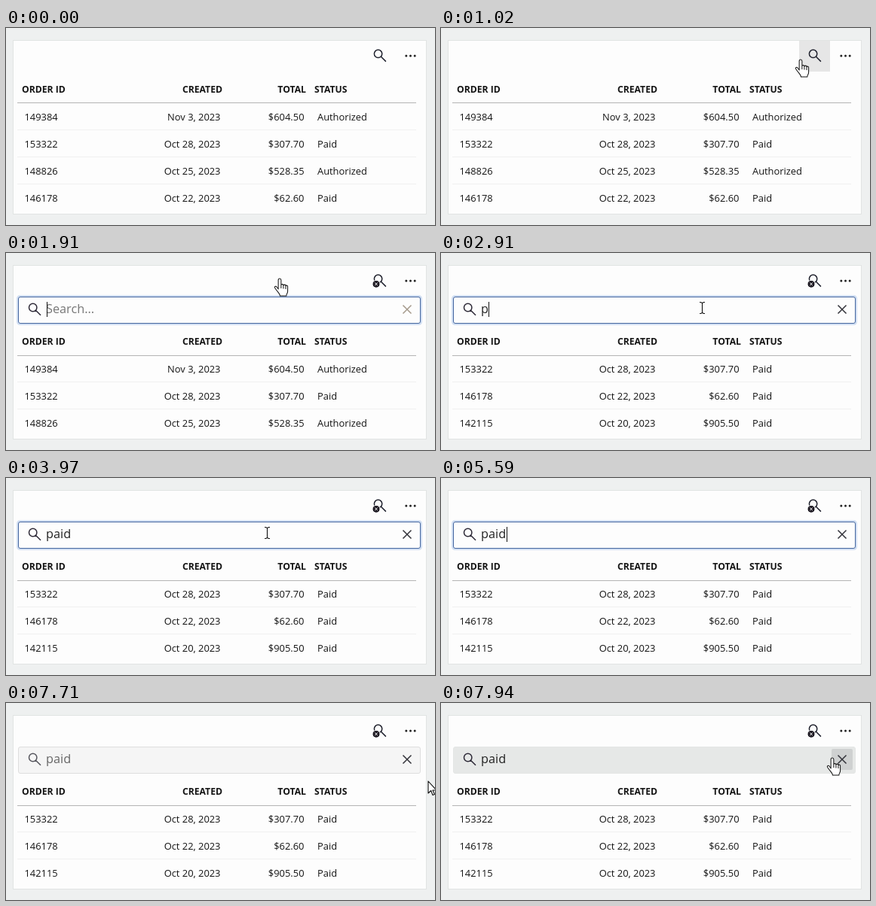
An HTML page for the animation above (8 s loop, 569x262 px).

```html
<!DOCTYPE html>
<html lang="en">
<head>
<meta charset="utf-8">
<title>Order search</title>
<style>
  html, body { margin: 0; height: 100%; overflow: hidden; background: #eef0f0; }
  svg { display: block; width: 569px; height: 262px; }
  text { font: 12.9px "Open Sans", "Noto Sans", sans-serif; }
  .head { font-size: 12.2px; font-weight: 700; }
  .field { font-size: 16.3px; }
  .end { text-anchor: end; }
  .icon { fill: none; stroke-width: 1.5; }
  .cursor { fill: #fff; stroke: #111; stroke-width: 1.1; stroke-linejoin: round; }
</style>
</head>
<body>
<svg id="stage" viewBox="0 0 569 262"></svg>
<script>
const LOOP = 8000, OPEN = 1590, BLUR = 5990, BLINK = 530;
const KEYS = [2910, 3110, 3310, 3440], WORD = "paid";
const ROWS = [
  ["149384", "Nov 3, 2023", "$604.50", "Authorized"],
  ["153322", "Oct 28, 2023", "$307.70", "Paid"],
  ["148826", "Oct 25, 2023", "$528.35", "Authorized"],
  ["146178", "Oct 22, 2023", "$62.60", "Paid"],
  ["142115", "Oct 20, 2023", "$905.50", "Paid"]
];
// Mouse moves: start, end, evenly timed stops; null means off stage
const MOVES = [
  [870, 1300, [[428, 53], [450, 48], [477, 42], [496, 38], [507, 36], [498, 36], [491, 35]]],
  [1500, 2120, [[491, 35], [491, 35], [491, 35], [478, 35], [420, 34], [363, 34], [352, 48], [347, 64], [346, 73]]],
  [4960, 5320, [[372, 76], [420, 84], [470, 97], [515, 110], [537, 121], null]],
  [7710, 7940, [[560, 104], [546, 90], [533, 79], [519, 73]]]
];

const stage = document.getElementById("stage");
const pen = document.createElement("canvas").getContext("2d");

const text = (x, y, s, cls = "", fill = "#151515") =>
  `<text x="${x}" y="${y}" class="${cls}" fill="${fill}">${s}</text>`;
const rect = (x, y, w, h, fill, more = "") =>
  `<rect x="${x}" y="${y}" width="${w}" height="${h}" fill="${fill}" ${more}/>`;
const icon = (d, color) => `<path class="icon" d="${d}" stroke="${color}"/>`;
const lens = (x, y, color) =>
  icon(`M${x + 5.2} ${y}a5.2 5.2 0 1 0-10.4 0a5.2 5.2 0 1 0 10.4 0M${x + 3.7} ${y + 3.7}l6.6 6.6`, color);

function mouseAt(t) {
  let at = null;
  for (const [from, to, stops] of MOVES) {
    if (t < from) break;
    const i = Math.floor((t - from) / (to - from) * (stops.length - 1) + 1e-6);
    at = stops[Math.min(i, stops.length - 1)];
  }
  return at;
}

function cursor(kind, [x, y]) {
  const shapes = {
    arrow: `<path d="M0 0V16L3.7 12.5 6 18.5 8.5 17.5 6 12H11Z"/>`,
    hand: `<path transform="scale(.93 1)" d="M-2 14V2a2 2 0 0 1 4 0V9a1.65 1.65 0 0 1 3.3 .5a1.65 1.65 0 0 1 3.3 .6a1.4 1.4 0 0 1 2.8 1V17C11.4 20 9.5 20 9.5 23H.5C.5 20-3 18-6.8 12.5C-8 10.5-5.5 9.5-4.3 11ZM2 9v4M5.3 9.5v4M8.6 10v4"/>`,
    beam: `<path fill="none" d="M-3-7.5H-1.5L.5-6.5 2.5-7.5H4M.5-6.5V6.5M-3 7.5H-1.5L.5 6.5 2.5 7.5H4"/>`
  };
  return `<g class="cursor" transform="translate(${x} ${y})">${shapes[kind]}</g>`;
}

function table(open, typed) {
  const dy = open ? 36 : 0;
  const rows = typed ? ROWS.filter(r => r[3] === "Paid") : ROWS;
  let out = text(21, 86 + dy, "ORDER ID", "head") + text(287, 86 + dy, "CREATED", "head end")
    + text(398, 86 + dy, "TOTAL", "head end") + text(409, 86 + dy, "STATUS", "head")
    + rect(15, open ? 136 : 99, 529, 1, "#b4b4b4");
  rows.slice(0, open ? 3 : 4).forEach(([id, date, total, status], i) => {
    const y = 123 + dy + 36 * i;
    out += text(24.5, y, id) + text(284.5, y, date, "end") + text(395.5, y, total, "end") + text(413, y, status);
    if (y < 220) out += rect(15, y + 12, 529, 1, "#f0f0f0");
  });
  return out;
}

function searchBar(t, typed, over, onClear) {
  const focus = t < BLUR;
  const ink = focus || over ? "#222" : "#666";
  const since = KEYS.filter(k => k <= t).pop() || OPEN;
  const caretOn = focus && Math.floor((t - since) / BLINK) % 2 === 0;
  pen.font = '16.3px "Open Sans", "Noto Sans", sans-serif';
  const caretX = Math.round(53.5 + pen.measureText(typed).width);
  let out = "";
  if (focus) out += rect(15.5, 57.5, 535, 37, "none", 'rx="3" stroke="#d3e0f3" stroke-width="3"');
  out += rect(16.5, 58.5, 533, 35, focus ? "#fdfdfd" : over ? "#e6e8e7" : "#f5f5f5",
    `rx="2.5" stroke="${focus ? "#43659f" : over ? "#e4e6e5" : "#dedede"}"`);
  if (onClear) out += rect(518, 61, 28, 28, "#cfd1d1", 'rx="2"');
  out += lens(35.7, 72.5, focus || over ? "#2c2836" : "#55555c")
    + icon("M526.5 69.5L537.5 80.5M537.5 69.5L526.5 80.5", typed ? "#33333a" : "#a59a8c")
    + text(53, 80, typed || "Search...", "field", typed ? ink : "#777");
  if (caretOn) out += rect(caretX, 65, 1, 20, "#111");
  return out;
}

function draw(t) {
  const open = t >= OPEN;
  const typed = WORD.slice(0, KEYS.filter(k => t >= k).length);
  const mouse = mouseAt(t);
  const [mx, my] = mouse || [-1, -1];
  const inBar = open && mx > 15 && mx < 550 && my > 57 && my < 94;
  const onClear = inBar && mx >= 518;
  const onSearch = mx >= 475 && mx < 516 && my > 16 && my < 58;

  let out = rect(9.5, 16.5, 548, 231, "#fdfdfd", 'stroke="#e1e4e3"');
  if (onSearch) out += rect(475, 17, 41, 41, "#e6e6e6");
  out += lens(493.6, 34.3, "#20222e");
  if (open) {
    out += `<circle cx="491" cy="41.3" r="5" fill="#1b1720" stroke="#fdfdfd"/>`
      + `<path d="M489.2 39.5l3.6 3.6m0-3.6l-3.6 3.6" stroke="#fff"/>`;
  }
  for (const x of [530.8, 536.5, 542.2]) out += `<circle cx="${x}" cy="37" r="1.5" fill="#222"/>`;
  out += table(open, typed);
  if (open) out += searchBar(t, typed, inBar, onClear);
  if (t >= 1500 && t < OPEN) out += `<circle cx="490.5" cy="36" r="12.5" fill="#f2ee3c" fill-opacity=".75"/>`;
  if (mouse) {
    const leaving = t >= 1500 && t < 2000 && my < 58;
    out += cursor(onSearch || onClear || leaving ? "hand" : inBar ? "beam" : "arrow", mouse);
  }
  stage.innerHTML = out;
}

function tick() {
  draw(performance.now() % LOOP);
  requestAnimationFrame(tick);
}
tick();
</script>
</body>
</html>
```
